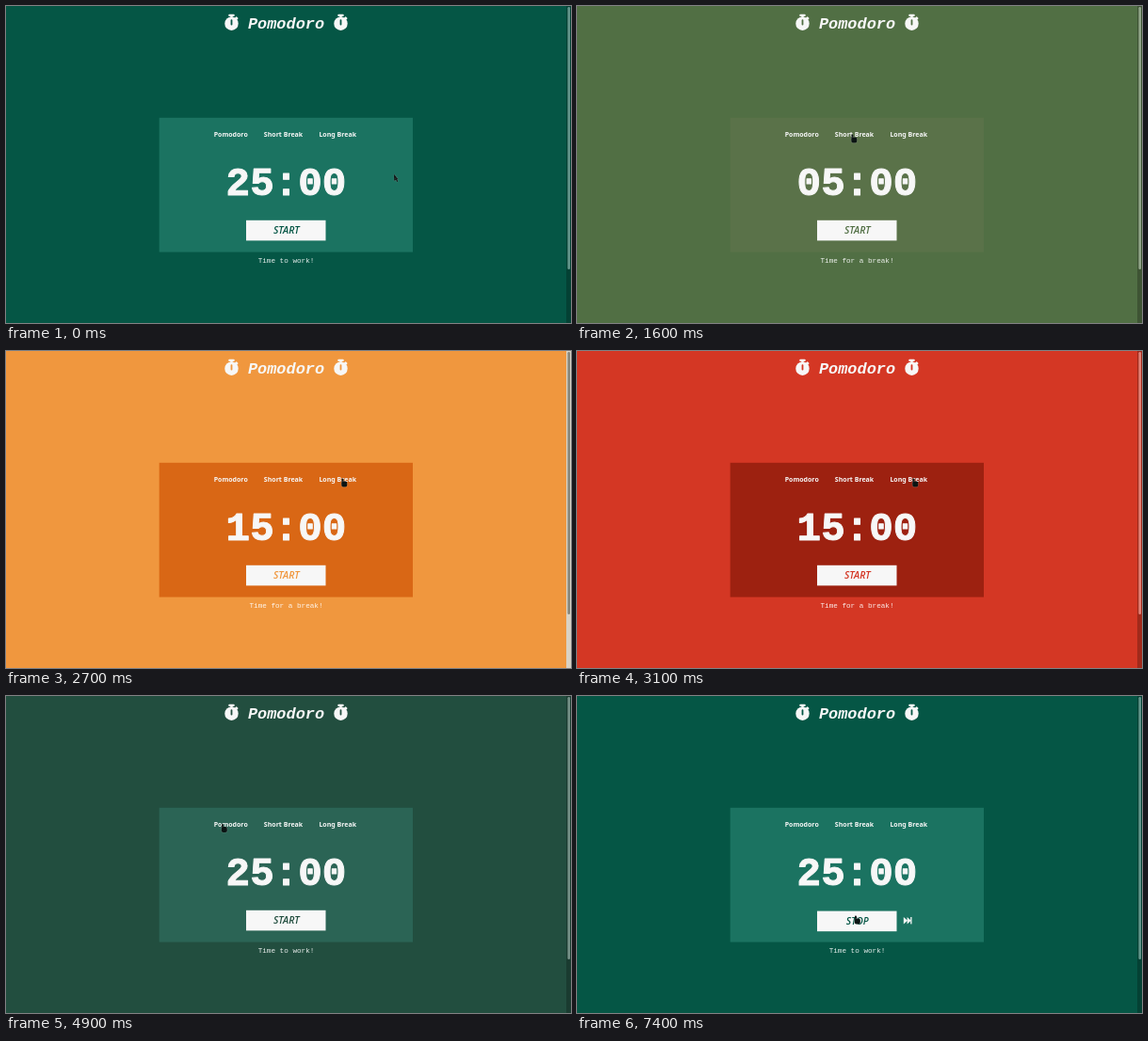
Animation, 600 px wide and 337 px high, one loop 8 s. Source, as an HTML page with a canvas:

```html
<!DOCTYPE html>
<html lang="en">
<head>
<meta charset="utf-8">
<title>Pomodoro</title>
<style>
  html, body { margin: 0; width: 100%; height: 100%; overflow: hidden; background: #055645; }
  canvas { display: block; width: 600px; height: 337px; }
</style>
</head>
<body>
<canvas id="stage"></canvas>
<script>
const W = 600, H = 337, MID = 297.5, LOOP = 8000, STEP = 100, FADE = 1000, STOP_AT = 6300;
const canvas = document.getElementById('stage');
const ctx = canvas.getContext('2d');
const dpr = window.devicePixelRatio || 1;
canvas.width = W * dpr;
canvas.height = H * dpr;

const WHITE = '#f7f7f7';
const MONO = '"Liberation Mono", monospace';
const SANS = '"Noto Sans", sans-serif';
const LABEL = '"Open Sans", "Noto Sans", sans-serif';

const GREEN = { page: [5, 86, 69], panel: [27, 115, 97] };
const ORANGE = { page: [244, 164, 66], panel: [225, 112, 22] };
const RED = { page: [204, 28, 28], panel: [140, 14, 14] };

const WORK = 'Time to work!', REST = 'Time for a break!';
const modes = [
  { from: -FADE, theme: GREEN, clock: '25:00', note: WORK },
  { from: 1390, theme: ORANGE, clock: '05:00', note: REST },
  { from: 2600, theme: RED, clock: '15:00', note: REST },
  { from: 4340, theme: GREEN, clock: '25:00', note: WORK }
];

// pointer moves; swing bends the way sideways
const home = { x: 411.5, y: 178.5 };
const moves = [
  { from: 300, to: 1100, x: 290, y: 136, swing: -62 },
  { from: 1600, to: 1950, x: 355, y: 135, swing: 0 },
  { from: 3500, to: 4300, x: 227.5, y: 135.5, swing: 0 },
  { from: 5100, to: 5500, x: 286.5, y: 222.5, swing: 13 },
  { from: 5700, to: 6100, x: 290, y: 232.5, swing: 40 },
  { from: 7200, to: 7400, x: 293.5, y: 233, swing: 0 }
];

const mix = (a, b, k) => a + (b - a) * k;
const mixRgb = (a, b, k) => a.map((v, i) => mix(v, b[i], k));
const rgb = c => `rgb(${c.map(Math.round).join(',')})`;
const clamp = v => Math.min(1, Math.max(0, v));
const smooth = k => k * k * (3 - 2 * k);

// the CSS "ease" curve
function ease(x) {
  const bez = (p, q, s) => 3 * p * s * (1 - s) ** 2 + 3 * q * s * s * (1 - s) + s ** 3;
  let lo = 0, hi = 1;
  for (let i = 0; i < 24; i++) {
    const mid = (lo + hi) / 2;
    if (bez(0.25, 0.25, mid) < x) lo = mid; else hi = mid;
  }
  return bez(0.1, 1, lo);
}

function stateAt(t) {
  let { page, panel } = GREEN, mode;
  for (const m of modes.filter(m => t > m.from)) {
    const k = ease(clamp((t - m.from) / FADE));
    page = mixRgb(page, m.theme.page, k);
    panel = mixRgb(panel, m.theme.panel, k);
    mode = m;
  }
  return { page, panel, mode, running: t >= STOP_AT };
}

function pointerAt(t) {
  let { x, y } = home;
  for (const m of moves) {
    const k = smooth(clamp((t - m.from) / (m.to - m.from)));
    x = mix(x, m.x, k) + m.swing * Math.sin(Math.PI * k);
    y = mix(y, m.y, k);
  }
  return { x, y };
}

function rect(x, y, w, h, fill) {
  ctx.fillStyle = fill;
  ctx.fillRect(x, y, w, h);
}

function round(x, y, w, h, r, fill) {
  ctx.fillStyle = fill;
  ctx.beginPath();
  ctx.roundRect(x, y, w, h, r);
  ctx.fill();
}

function triangle(x1, y1, x2, y2, x3, y3, fill) {
  ctx.fillStyle = fill;
  ctx.beginPath();
  ctx.moveTo(x1, y1);
  ctx.lineTo(x2, y2);
  ctx.lineTo(x3, y3);
  ctx.fill();
}

function text(str, x, y, font, fill = WHITE, weight = 0) {
  ctx.font = font;
  ctx.fillStyle = ctx.strokeStyle = fill;
  ctx.fillText(str, x, y);
  if (weight) {
    ctx.lineWidth = weight;
    ctx.lineJoin = 'round';
    ctx.strokeText(str, x, y);
  }
}

function stopwatch(x, page) {
  round(x - 7.2, 11.5, 14.4, 14.4, 7.2, WHITE);
  round(x - 3.2, 8.8, 6.4, 2.2, 0.8, WHITE);
  rect(x - 1.2, 10, 2.4, 3, WHITE);
  ctx.save();
  ctx.translate(x + 5.3, 13);
  ctx.rotate(Math.PI / 4);
  round(-1.5, -1.3, 3, 2.8, 0.6, WHITE);
  ctx.restore();
  round(x - 0.9, 14.2, 1.8, 6.4, 0.8, page);
}

function skipIcon() {
  for (const x of [346.8, 350.6]) triangle(x, 235, x + 4.2, 238.7, x, 242.4, WHITE);
  rect(354.2, 235, 1.3, 7.4, WHITE);
}

function scrollbar(page) {
  const light = page[0] > 180 && page[1] > 125;
  rect(595, 0, 5, H, light ? '#d9d2c4' : rgb(page.map(v => v * 0.76)));
  round(596.4, 1, 2.6, 279, 1.3, light ? '#85857a' : rgb(mixRgb(page, [255, 255, 255], 0.38)));
}

function pointer({ x, y }, hand) {
  const ink = '#0b1413';
  ctx.save();
  ctx.translate(x, y);
  ctx.shadowColor = 'rgba(255,255,255,0.5)';
  ctx.shadowBlur = dpr;
  if (hand) {
    round(1.5, 0.6, 1.9, 6, 0.9, ink);
    round(1.3, 3.6, 6, 6, 1.8, ink);
  } else {
    triangle(0.5, 0.3, 5, 5.4, 0.7, 7.3, ink);
    ctx.rotate(-0.4);
    rect(0, 4.8, 1.3, 4.4, ink);
  }
  ctx.restore();
}

function draw(t) {
  const { page, panel, mode, running } = stateAt(t);
  const back = rgb(page);
  ctx.setTransform(dpr, 0, 0, dpr, 0, 0);
  rect(0, 0, W, H, back);

  ctx.textAlign = 'center';
  for (const side of [-58, 58]) stopwatch(MID + side, back);
  text('Pomodoro', MID, 23.8, `italic bold 16.9px ${MONO}`);

  rect(162.7, 118.8, 269.3, 142.8, rgb(panel));
  const tab = `bold 7px ${SANS}`;
  text('Pomodoro', 238.7, 139, tab);
  text('Short Break', 294.5, 139, tab);
  text('Long Break', 352.2, 139, tab);
  text(mode.clock, MID, 200.9, `bold 42.6px ${MONO}`, WHITE, 1);

  const drop = running ? 0.8 : 0;
  rect(255, 227.8 + drop, 84.5, 21.6, WHITE);
  text(running ? 'STOP' : 'START', 297.8, 242.3 + drop, `italic 600 10.4px ${LABEL}`, back);
  if (running) skipIcon();

  text(mode.note, MID, 273, `7.65px ${MONO}`, 'rgba(255,255,255,0.9)');
  scrollbar(page);

  const spot = pointerAt(t);
  const onTabs = t >= 1000 && spot.y < 140;
  const onButton = t >= STOP_AT - 400;
  pointer(spot, onTabs || onButton);
}

const start = performance.now();
function tick(now) {
  const t = Math.max(0, now - start) % LOOP;
  draw(Math.floor(t / STEP) * STEP);
  requestAnimationFrame(tick);
}
draw(0);
requestAnimationFrame(tick);
</script>
</body>
</html>
```
